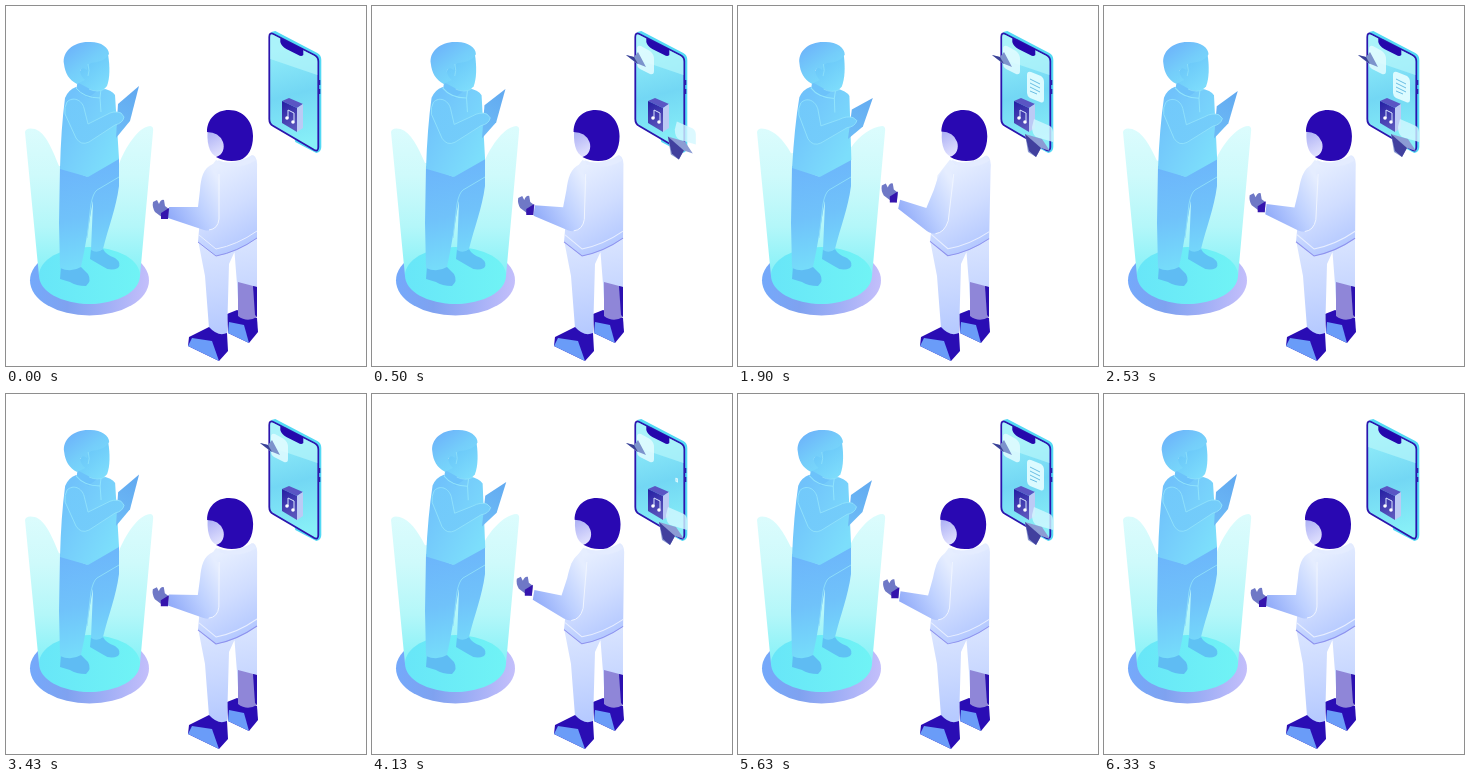
An HTML page that plays this animation: 360 px wide and 360 px high, repeating every 6410 ms.

```html
<!DOCTYPE html>
<html lang="en">
<head>
<meta charset="utf-8">
<title>Hologram call</title>
<style>
html, body { margin: 0; width: 100%; height: 100%; overflow: hidden; background: #fff; }
svg { display: block; width: 100%; height: 100%; }
</style>
</head>
<body>
<svg viewBox="0 0 360 360">
<defs id="defs"></defs>

<!-- projector -->
<ellipse cx="83.5" cy="274.5" rx="59.5" ry="35" fill="url(#rim)"/>
<path id="beam" fill="url(#beamFill)"/>
<ellipse cx="83.5" cy="269.5" rx="50.5" ry="28.5" fill="url(#disc)"/>

<!-- projected man -->
<g stroke-linejoin="round">
  <path d="M85 243Q91 247 97 243Q100 249 109 252Q116 257 112 262Q104 266 96 260L84 253Z" fill="#5fc2f4"/>
  <path d="M55 260Q65 266 74 260L82 268Q86 275 80 280Q70 280 64 276L54 273Z" fill="#5fbcf3"/>
  <path d="M80 168L113 152V180C110 203 102 222 97 243Q91 248 85 244L87 196Z" fill="url(#legs)"/>
  <path d="M54 160L82 171L113 155V172L89 186C85 201 81 235 75 261Q65 267 54 262L53 217Z" fill="url(#legs)"/>
  <path d="M113 171L91 184Q87 187 85 198L81 232" fill="none" stroke="#8cddfa"/>
  <g id="man">
    <path d="M72 72L96 79L95 93L80 95L70 86Z" fill="#6cc2fa"/>
    <path d="M70 81Q62 84 59 92Q55 122 54 163L82 171L113 153L109 89Q106 84 95 82L82 92Z" fill="url(#shirt)"/>
    <path d="M70 82Q78 92 94 92L95 83M94 92L95 106" fill="none" stroke="#91e4fc"/>
    <path d="M78 57L102 48C104 60 104 72 101 80Q95 88 84 83L69 75Z" fill="url(#face)"/>
    <path d="M58 58C56 46 67 36 82 36C94 35 103 41 103 48C99 55 92 56 85 57Q81 59 81 64Q76 60 74 65Q75 71 79 74L71 78C63 74 59 67 58 58Z" fill="url(#hair)"/>
    <path d="M83 83Q91 87 99 83M82 58Q84 65 82 70" fill="none" stroke="#8fe2fb" stroke-width=".8"/>
  </g>
  <path id="tablet" fill="url(#tab)"/>
  <path id="manArm" fill="url(#sleeve)" stroke="#91e3fc" stroke-width=".9"/>
</g>

<!-- woman -->
<g stroke-linejoin="round">
  <path d="M228 240L251 230V286L249 309H233L231 278Z" fill="url(#trousers)"/>
  <path d="M221 308L231 304L251 312L252 326L243 337L222 327Z" fill="#2a0db4"/>
  <path d="M222 327L223 316L238 319L243 337Z" fill="#6a9cf8"/>
  <path d="M232 276L251 281V311Q241 317 232 310Z" fill="#8f86d8"/>
  <path d="M247 280L251 281V311L249 309Z" fill="#2b10b0"/>
  <path d="M192 234L251 230L228 247L223 258L221 329Q212 332 203 322L199 270Z" fill="url(#trousers)"/>
  <path d="M183 331L203 321Q212 331 221 327L222 345L213 355L182 340Z" fill="#2a0db4"/>
  <path d="M182 340L186 332L206 335L213 355Z" fill="#6a9cf8"/>
  <g id="woman">
    <path d="M210 154Q224 161 247 149Q252 151 251 164L251 232Q232 247 210 250L192 236L195 200L198 170Z" fill="url(#jacket)"/>
    <path d="M212 154Q229 162 246 149L250 154Q235 164 215 159Z" fill="#e4ecff"/>
    <path d="M193 229L210 243Q231 239 251 225" fill="none" stroke="#e8efff"/>
    <path d="M192 236L210 250Q231 246 251 232" fill="none" stroke="#8e92ee"/>
    <path d="M202 121C200 136 203 148 211 151Q220 150 222 137L216 121Z" fill="url(#skin)"/>
    <path d="M201 126C201 113 210 104 223 104C237 104 247 115 247 130C247 143 242 151 234 154Q221 157 210 151C217 149 219 142 217 136Q213 126 201 126Z" fill="#2908b2"/>
  </g>
  <path id="arm" fill="url(#armFill)"/>
  <path id="seam" fill="none" stroke="#f0f5ff"/>
  <g id="hand">
    <path d="M157 212L149 206Q146 201 147 196L151 194L153 198Q155 193 158 194L159 200L163 203L162 213Z" fill="#6f78c6"/>
    <path d="M155 207L163 202L162 213H155Z" fill="#3514ad"/>
  </g>
</g>

<!-- phone -->
<g stroke-linejoin="round">
  <g transform="translate(-.7 1)">
    <path d="M266 25L270 24L312 46Q316 48 316 53V140Q316 145 311 146L290 135Z" fill="#54d9f4"/>
    <path d="M264 30Q264 25 268 27L309 48Q313 50 313 54V140Q313 145 309 143L268 119Q264 117 264 112Z" fill="url(#screen)" stroke="#2c14ad" stroke-width="1.8"/>
    <path d="M265 31Q265 27 268 28L309 49Q312 51 312 55V68L265 52Z" fill="#baf7fb" opacity=".65"/>
    <path d="M275 31L298 42V48Q296 50 293 48L281 42Q276 39 275 35Z" fill="#2508ac"/>
    <path d="M314 73V78M314 82V87" stroke="#2d1eac" stroke-width="2"/>
  </g>
  <path d="M276 95L283 92L297 98L291 102Z" fill="#5a55c4"/>
  <path d="M276 95L291 102V126L276 117Z" fill="url(#box)"/>
  <path d="M291 102L297 98V122L291 126Z" fill="#bccaf5"/>
  <path d="M282 112V104L288 107V115" fill="none" stroke="#d9e5ff"/>
  <circle cx="281" cy="112" r="1.8" fill="#fff"/>
  <circle cx="287" cy="116" r="1.8" fill="#fff"/>

  <g id="sent">
    <path d="M265 43Q265 39 269 40L278 45Q282 48 282 53V65Q282 69 278 68L268 63Q265 61 265 58Z" fill="#e3fcff" opacity=".85"/>
    <path d="M254 49L262 51L266 46L274 61L264 57Z" fill="#7c93cc"/>
    <path d="M254 49L262 51L266 58L262 55Z" fill="#3b3f95"/>
  </g>
  <g id="note">
    <path d="M289 69Q289 65 293 66L303 70Q306 72 306 76V93Q306 98 302 96L292 92Q289 90 289 87Z" fill="#dcfbff"/>
    <path d="M292 73L302 78M292 77L302 82M292 81L302 86M292 85L299 88" stroke="#69bde4"/>
  </g>
  <g id="reply">
    <path d="M296 113L312 120Q315 122 315 126V136L298 131Q294 128 294 121Z" fill="#d3f8ff" opacity=".8"/>
    <path d="M287 128L304 133L312 145L303 142L298 151L290 146Z" fill="#8c9cd4"/>
    <path d="M287 128L303 142L298 151L291 145Z" fill="#41409e"/>
  </g>
</g>
</svg>
<script>
const LOOP = 6410, CYCLE = LOOP / 2;
const $ = id => document.getElementById(id);

// id, x1, y1, x2, y2, then evenly spaced colours
const gradients = [
  ["rim", 24, 270, 143, 280, "#74a9fb", "#7fa2f0", "#a1aff6", "#c4bffb"],
  ["disc", 33, 270, 134, 270, "#68e6f8", "#70f3f5"],
  ["beamFill", 0, 120, 0, 270, "#dcfcfd", "#cefafb", "#b4f7f9", "#84f1f7"],
  ["legs", 60, 160, 85, 262, "#6cb5fb", "#70c2fa", "#76defa"],
  ["shirt", 55, 110, 113, 140, "#70c2fb", "#77d0fb", "#7cdefb"],
  ["face", 78, 55, 102, 84, "#6ac6f9", "#7fdffc"],
  ["hair", 65, 40, 92, 76, "#6db5fa", "#74cdfa", "#7adcfb"],
  ["tab", 112, 125, 134, 85, "#6cbaf6", "#62a9f0"],
  ["sleeve", 60, 95, 110, 125, "#72c9fb", "#74cdfa"],
  ["trousers", 200, 240, 214, 325, "#d9e4ff", "#c9d8ff", "#b6caff"],
  ["jacket", 205, 165, 248, 238, "#e6eeff", "#d0ddff", "#b2c7ff"],
  ["skin", 202, 125, 216, 150, "#aaaef4", "#e5e5ff"],
  ["armFill", 160, 205, 213, 175, "#91abf9", "#bdd0ff", "#e5edff"],
  ["screen", 275, 40, 300, 135, "#91edf9", "#73d7f4", "#87eff7"],
  ["box", 276, 95, 291, 120, "#241da2", "#5a55bc"]
];
$("defs").innerHTML = gradients.map(([id, x1, y1, x2, y2, ...colors]) =>
  `<linearGradient id="${id}" gradientUnits="userSpaceOnUse" x1="${x1}" y1="${y1}" x2="${x2}" y2="${y2}">` +
  colors.map((c, i) => `<stop offset="${i / (colors.length - 1)}" stop-color="${c}"/>`).join("") +
  "</linearGradient>").join("");

// Each pair holds the lowered and the raised pose.
const poses = {
  beam: [
    "M19 126Q20 121 29 123C40 127 46 143 53 160L113 158C119 142 132 121 144 120Q148 120 147 126L134 270Q84 326 33 270Z",
    "M19 126Q20 121 27 123C36 125 45 132 53 146L113 140C122 128 134 121 144 120Q148 120 147 126L134 270Q84 326 33 270Z"
  ],
  tablet: ["M112 98L133 80L124 115L110 132Z", "M114 104L135 93L125 121L110 133Z"],
  manArm: [
    "M61 96C67 90 76 94 78 102L82 118L100 109Q108 104 115 107L118 111Q117 117 109 119L83 136Q75 140 70 132L59 108Q58 101 61 96Z",
    "M63 97C69 91 77 94 80 103L83 120L101 114Q109 110 115 112L119 115Q117 121 109 122L83 137Q75 141 70 133L61 109Q60 102 63 97Z"
  ],
  arm: [
    "M207 158C197 162 195 172 194 184L192 201L163 201L162 212L198 224C206 226 212 222 213 214L214 175Z",
    "M211 159C204 162 200 172 196 184L188 202L162 193L160 202L188 225C197 231 206 227 210 216L216 175Z"
  ],
  seam: ["M213 168L213 213Q212 223 203 224", "M216 168L210 215Q206 227 197 228"]
};
const NUM = /-?\d+(\.\d+)?/g;
function mix([a, b], u) {
  const ends = b.match(NUM);
  let i = 0;
  return a.replace(NUM, n => (+n + (ends[i++] - n) * u).toFixed(2));
}

const ramp = (t, from, to) => {
  const p = Math.min(1, Math.max(0, (t - from) / (to - from)));
  return p * p * (3 - 2 * p);
};

function place(id, x, y, scale, cx, cy, alpha) {
  $(id).setAttribute("transform", `translate(${cx + x} ${cy + y}) scale(${scale}) translate(${-cx} ${-cy})`);
  $(id).setAttribute("opacity", alpha);
}

function draw(now) {
  // The picture holds for 30 ms and 70 ms in turn.
  const ms = now % LOOP, step = ms % 100;
  const time = Math.min(6330, ms - step + (step < 30 ? 0 : 30));
  const t = time % CYCLE;
  const u = (1 - Math.cos(2 * Math.PI * t / CYCLE)) / 2;

  for (const id in poses) $(id).setAttribute("d", mix(poses[id], u));
  $("man").setAttribute("transform", `rotate(${2 * u} 82 165)`);
  $("woman").setAttribute("transform", `rotate(${1.3 * u} 222 240)`);
  $("hand").setAttribute("transform", `translate(${-3.5 * u} ${-18 * u})`);

  const sentIn = ramp(t, 30, 210), sentOut = ramp(t, 2700, 3050);
  place("sent", 0, -22 * sentOut, .5 + .5 * sentIn, 272, 54, sentIn * (1 - sentOut));

  const replyIn = ramp(t, 290, 800), replyOut = ramp(t, 2620, 3000);
  place("reply", 14 * (1 - replyIn), 4 * (1 - replyIn), 1 - .5 * replyOut, 302, 130,
    ramp(t, 290, 450) * (1 - replyOut));

  const noteSize = ramp(t, 800, 1300) * (1 - ramp(t, 2600, 2950));
  place("note", 0, 0, noteSize, 306, 87, noteSize > 0 ? 1 : 0);
}

const start = performance.now();
function tick() {
  draw(performance.now() - start);
  requestAnimationFrame(tick);
}
tick();
</script>
</body>
</html>
```
